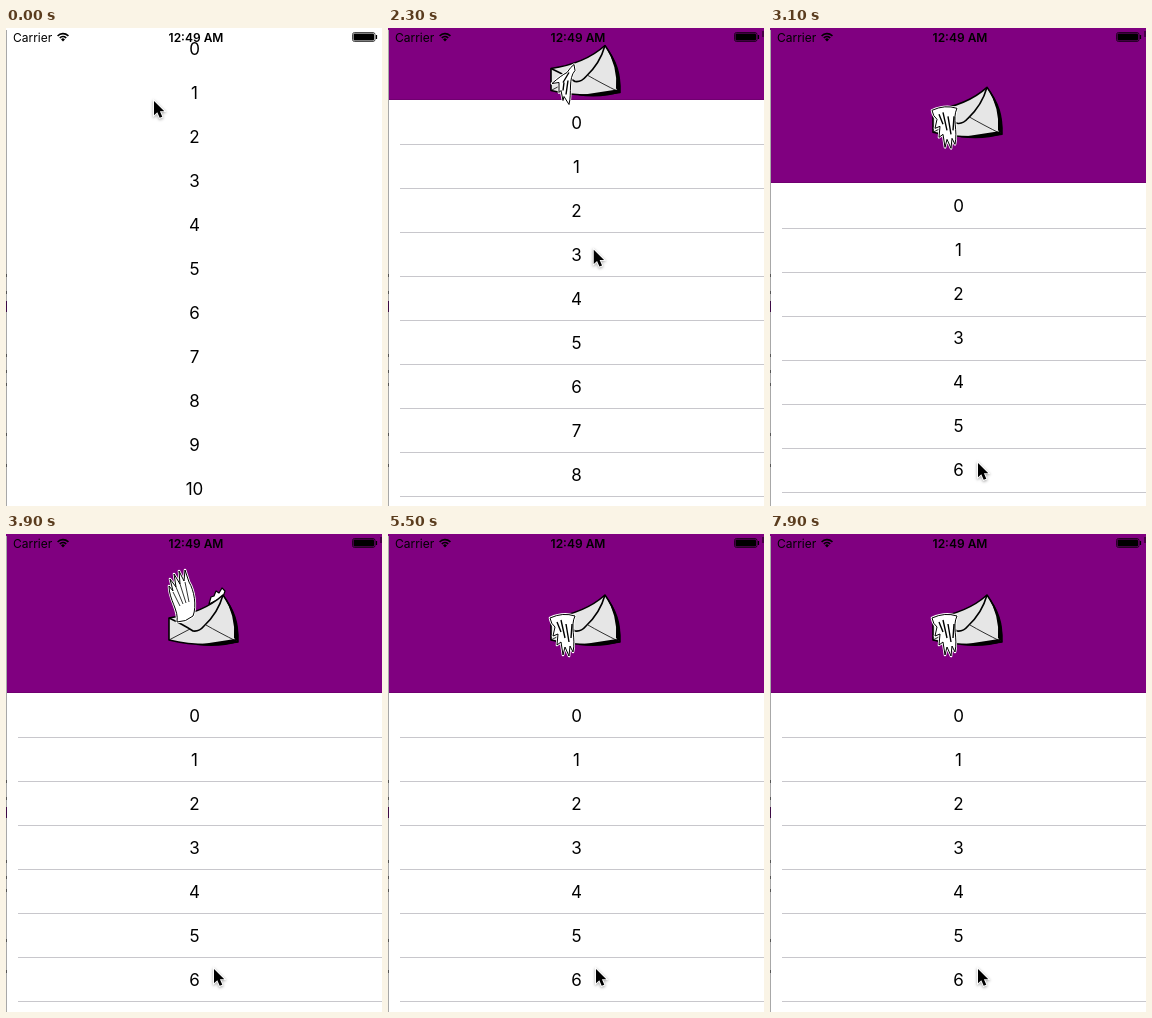
Write an HTML page with a canvas that moves like this. It is 376x478 px and loops after 8000 ms.

```html
<!DOCTYPE html>
<html lang="en">
<head>
<meta charset="utf-8">
<title>Pull to refresh</title>
<style>
html, body { margin: 0; width: 100%; height: 100%; overflow: hidden; background: #fff; }
canvas { display: block; }
</style>
</head>
<body>
<canvas id="stage" width="376" height="478"></canvas>
<script>
const W = 376, HGT = 478, LOOP = 8000, STEP = 100, BEAT = 340;
const REST = 159; // header height while refreshing
const ctx = document.getElementById('stage').getContext('2d');
const FONT = 'Inter, "Liberation Sans", sans-serif';

// [time, header height]
const pull = [[1800, -2], [1900, 7.5], [2100, 36], [2300, 72], [2600, 121.5],
  [2800, 142], [3000, 154], [3300, REST]];
// [time, x, y]
const mouse = [[0, 148, 73], [200, 159, 47], [900, 159, 47], [1300, 183, 43],
  [1800, 183, 43], [1900, 187, 72], [2200, 201, 182], [2600, 220, 341],
  [2800, 217, 392], [3100, 208, 435]];

function at(keys, t, i = 1) {
  if (t <= keys[0][0]) return keys[0][i];
  for (let k = 1; k < keys.length; k++) {
    const a = keys[k - 1], b = keys[k];
    if (t <= b[0]) return a[i] + (b[i] - a[i]) * (t - a[0]) / (b[0] - a[0]);
  }
  return keys[keys.length - 1][i];
}

const path = d => new Path2D(d);

const body = path('M163 84Q197 79 217 61Q232 82 232 108Q196 114 163 106Z');
const flap = path('M163 84Q178 91 187 97Q193 98 198 92Q212 79 217 61');
const folds = path('M163 106L184 95M232 108Q212 98 200 91');
const shade = path('M217 61Q235 82 232 108L228 104Q230 82 217 61ZM232 108Q214 114 190 111L229 105Z');
const farWing = path('M203 70L205 63L208 62L210 57L213 59L216 54L219 57L217 63Z');

const wings = {
  up: {
    edge: path('M171 88C173 76 163 66 163 52L167 57L164 45L170 53L168 40L174 50L173 37L178 47L179 36L183 48C188 56 191 72 187 82Q180 88 171 88Z'),
    quills: path('M167 58L174 72M170 53L177 70M174 50L180 69M179 48L183 68'),
    line: 0.8
  },
  down: {
    edge: path('M162 84Q175 78 187 82C182 92 188 104 185 118L182 112L181 122L177 113L175 121L173 108L169 111L170 100L165 102L167 93Q163 90 162 84Z'),
    quills: path('M173 86L177 104M178 90L181 108M169 88L173 98M184 90L183 104'),
    line: 1.4
  },
  fold: {
    edge: path('M186 80L187 86C180 94 184 108 181 120L176 112L175 116L173 106L171 108L171 98L164 99Q173 91 179 88Q183 82 186 80Z'),
    quills: path('M181 88L175 98M180 96L178 110M176 98L175 106'),
    line: 1.4
  }
};

// [end of phase, wing, vertical stretch, tilt]
const beat = [[30, 'up', 1, 0], [50, 'down', 1, 0], [190, 'fold', 1, 0],
  [215, 'down', 1.2, 0], [275, 'down', 1, 0], [290, 'up', 0.95, -0.42],
  [312, 'up', 1.16, 0], [BEAT, 'up', 1, 0]];

function ink(p, fill, stroke, width) {
  if (fill) { ctx.fillStyle = fill; ctx.fill(p); }
  if (stroke) { ctx.strokeStyle = stroke; ctx.lineWidth = width; ctx.stroke(p); }
}

function rect(color, x, y, w, h) {
  ctx.fillStyle = color;
  ctx.fillRect(x, y, w, h);
}

function text(s, x, y, font, align) {
  ctx.font = font + ' ' + FONT;
  ctx.textAlign = align;
  ctx.fillStyle = '#000';
  ctx.fillText(s, x, y);
}

function drawLetter(t, head) {
  const phase = ((t - 3900) % BEAT + BEAT) % BEAT;
  const [, name, stretch, tilt] = beat.find(b => phase < b[0]);
  const wing = wings[name];
  ctx.save();
  ctx.lineJoin = 'round';
  ctx.translate(0, (head - REST) / 2);
  if (name === 'up') ink(farWing, '#fff', '#000', 1.2);
  ink(body, '#e6e6e6', '#000', 1.6);
  ink(folds, null, '#000', 0.8);
  ink(flap, null, '#000', 1.6);
  ink(shade, '#000');
  const pivot = name === 'up' ? 86 : 82;
  ctx.translate(178, pivot);
  ctx.rotate(tilt);
  ctx.scale(1, stretch);
  ctx.translate(-178, -pivot);
  ink(wing.edge, null, '#fff', 2.6);
  ink(wing.edge, '#fff', '#000', 1);
  ink(wing.quills, null, '#000', wing.line);
  ctx.restore();
}

function drawRows(head, lines) {
  for (let n = 0; n < 12; n++) {
    const top = head + n * 44;
    text(n, 188.5, top + 28.5, '17px', 'center');
    if (lines) rect('#c8c7cc', 12, Math.floor(top + 44.5), W - 12, 1);
  }
}

function drawStatus() {
  text('Carrier', 7, 14, '12px', 'left');
  text('12:49 AM', 190, 14, '600 12px', 'center');
  ctx.strokeStyle = '#000';
  ctx.lineWidth = 1.6;
  for (const r of [4.4, 7.4]) {
    ctx.beginPath();
    ctx.arc(57, 13, r, -Math.PI * 0.76, -Math.PI * 0.24);
    ctx.stroke();
  }
  ctx.beginPath();
  ctx.moveTo(57, 13.5);
  ctx.arc(57, 13, 2.5, -Math.PI * 0.78, -Math.PI * 0.22);
  ctx.fillStyle = '#000';
  ctx.fill();
  ctx.lineWidth = 0.7;
  ctx.beginPath();
  ctx.roundRect(346.5, 4.5, 22.5, 9, 2);
  ctx.stroke();
  ctx.beginPath();
  ctx.roundRect(347.5, 5.5, 20.5, 7, 1);
  ctx.fill();
  rect('#000', 369.8, 7, 1.3, 4);
}

function drawEdge() {
  rect('#a8a8a8', 0, 2, 1, HGT - 2);
  for (const y of [246, 263, 326, 342, 355, 405, 436]) rect('#555', 0, y, 1, 3);
  rect('#3d0a45', 0, 273, 1, 11);
}

const arrow = path('M0 0V14.2L3.3 11.2L5.7 16.8L8.3 15.7L5.9 10.2H10.3Z');

function drawMouse(t) {
  ctx.save();
  ctx.translate(at(mouse, t), at(mouse, t, 2));
  ctx.shadowColor = 'rgba(0,0,0,.4)';
  ctx.shadowBlur = 3;
  ctx.shadowOffsetY = 1;
  ink(arrow, null, '#fff', 1.8);
  ctx.shadowColor = 'transparent';
  ink(arrow, '#000');
  ctx.restore();
}

function draw(t) {
  const head = at(pull, t), pulled = t >= 1900, open = t >= 2000;
  rect('#fff', 0, 0, W, HGT);
  drawRows(head, open);
  if (open) {
    const h = Math.floor(head);
    rect('#800080', 0, 0, W, h);
    rect('#700070', 0, h - 1, W, 1);
    rect('rgba(0,0,0,.45)', 374, 3, 2, 6);
  } else if (pulled) {
    rect('#800080', 0, 0, W, 1);
    rect('#808080', 374, 2, 2, 91);
  }
  if (pulled) drawLetter(t, head);
  drawEdge();
  drawStatus();
  drawMouse(t);
}

const start = performance.now();
function tick() {
  const t = (performance.now() - start) % LOOP;
  draw(Math.floor(t / STEP) * STEP);
  requestAnimationFrame(tick);
}
tick();
</script>
</body>
</html>
```
